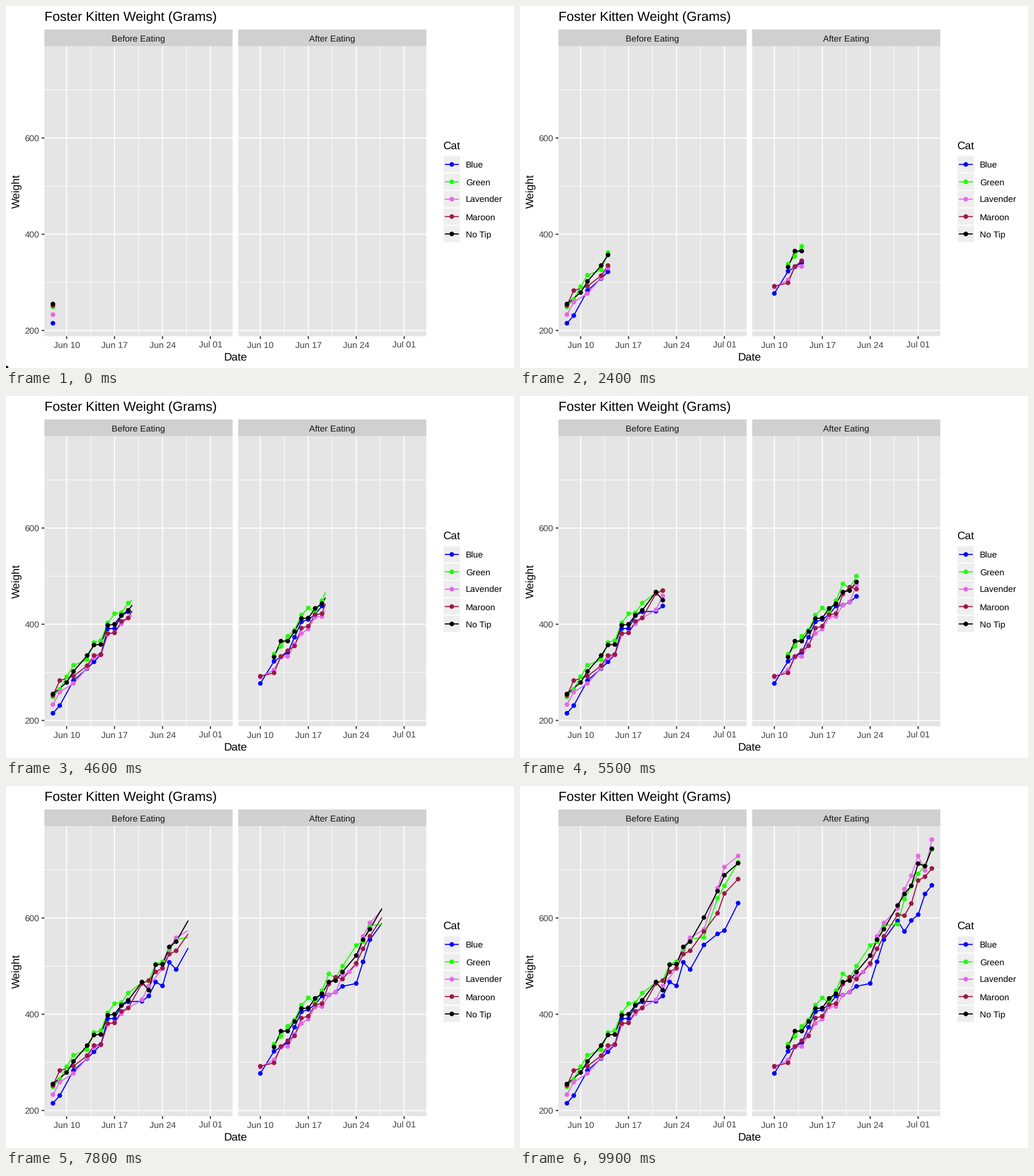
Animation of 885 by 632 pixels, one loop 10 s. Source, as a matplotlib script:

```python
import matplotlib.pyplot as plt
import numpy as np
from matplotlib.animation import FuncAnimation
from matplotlib.patches import Rectangle

plt.rcParams.update({
    "font.family": "Liberation Sans",
    "text.hinting": "none",
    "path.snap": False,
    "lines.solid_capstyle": "butt",
    "lines.solid_joinstyle": "round",
})

W, H = 885, 632
FRAMES, SPAN = 100, 25          # days from Jun 8 to Jul 3
PX = 0.72                       # points per pixel at 100 dpi
THICK, THIN, DOT = 1.87, 0.94, 8.1
TOP, BOTTOM, PANEL_W = 70, 576.5, 327.7
NA = np.nan

COLORS = {"Blue": "#0000ff", "Green": "#1eff00", "Lavender": "#e566ea",
          "Maroon": "#9c1848", "No Tip": "#000000"}

before_days = [0, 1, 2, 3, 5, 6, 7, 8, 9, 10, 11,
               13, 14, 15, 16, 17, 18, 20, 22, 23, 25]
before = {
    "Blue": [215, 231, NA, 283, 308, 322, 337, 391, 391, 418, 426,
             427, 438, 467, 459, 508, 493, 544, 567, 574, 631],
    "Green": [249, 265, 291, 315, 326, 362, 366, 403, 422, 424, 444,
              466, 470, 504, 509, 533, 556, 560, 641, 667, 716],
    "Lavender": [233, 259, NA, 277, 309, 330, 336, 379, 383, 401, 413,
                 430, 459, NA, 495, 537, 559, 576, 662, 706, 729],
    "Maroon": [252, 283, NA, 292, 314, 335, 337, 381, 382, 406, 413,
               464, 470, 488, 496, 525, 532, 572, 610, 651, 681],
    "No Tip": [255, NA, 279, 302, 335, 357, 358, 398, 400, 419, 429,
               467, 450, 503, 504, 540, 551, 601, 656, 689, 714],
}

after_days = [2, 4, 5, 6, 7, 8, 9, 10, 11, 12, 13,
              14, 15, 16, 17, 18, 20, 21, 22, 23, 24, 25]
after = {
    "Blue": [277, 323, 332, 341, 373, 405, 410, 420, 438, 440, 446,
             458, NA, 464, 509, 555, 594, 572, 595, 607, 650, 668],
    "Green": [NA, 338, 354, 375, 388, 419, 434, 424, 449, 484, 475,
              500, NA, 543, 551, 584, 587, 639, 667, 692, 709, 743],
    "Lavender": [290, 305, 332, 333, 358, 381, 390, 415, 416, 440, 446,
                 481, 488, 503, 562, 590, 620, 660, 688, 729, 699, 763],
    "Maroon": [292, 299, 333, 345, 355, 392, 396, 420, 422, 463, 477,
               473, NA, 506, 536, 562, 607, 605, 630, 678, 686, 703],
    "No Tip": [NA, 332, 365, 365, 385, 412, 413, 433, 443, 467, 470,
               488, NA, 522, 555, 577, 626, 650, 667, 713, 708, 744],
}

PANELS = [(67, "Before Eating", before_days, before),
          (404.5, "After Eating", after_days, after)]

fig = plt.figure(figsize=(W / 100, H / 100), dpi=100, facecolor="white")
ax = fig.add_axes([0, 0, 1, 1])
ax.set_xlim(0, W)
ax.set_ylim(H, 0)
ax.axis("off")


def x_of(day, left):
    return left + 14.75 + 11.93 * np.asarray(day)


def y_of(grams):
    return 566.5 - 0.84 * (np.asarray(grams) - 200)


def box(x, y, w, h, color):
    ax.add_patch(Rectangle((x, y), w, h, fc=color, lw=0, zorder=0))


def rule(xs, ys, width, color="white", z=1):
    return ax.plot(xs, ys, color=color, lw=width * PX, zorder=z)[0]


def dots(xs, ys, color, z):
    return ax.scatter(xs, ys, s=(DOT * PX) ** 2, c=color,
                      edgecolors="none", zorder=z)


def label(x, y, text, size, color="black", ha="center", **kw):
    ax.text(x, y, text, fontsize=size * PX, color=color, ha=ha,
            va="baseline", **kw)


def draw_panel(left, title):
    right = left + PANEL_W
    box(left, 41, PANEL_W, TOP - 41, "#d0d0d0")
    box(left, TOP, PANEL_W, BOTTOM - TOP, "#e5e5e5")
    label(left + PANEL_W / 2, 61.5, title, 15.45, "#141414")
    for day in (5.5, 12.5, 19.5):
        rule([x_of(day, left)] * 2, [TOP, BOTTOM], THIN)
    for grams in (300, 500, 700):
        rule([left, right], [y_of(grams)] * 2, THIN)
    for grams in (200, 400, 600):
        rule([left, right], [y_of(grams)] * 2, THICK)
    for day, text in zip((2, 9, 16, 23),
                         ("Jun 10", "Jun 17", "Jun 24", "Jul 01")):
        x = x_of(day, left)
        rule([x, x], [TOP, BOTTOM], THICK)
        rule([x, x], [BOTTOM, BOTTOM + 4.8], THICK, "#282828")
        label(x, 596.5, text, 15.45, "#404040")


def draw_legend():
    label(761.5, 250.3, "Cat", 19.3, ha="left")
    for i, (name, color) in enumerate(COLORS.items()):
        y = 276.6 + 30.33 * i
        box(762.4, y - 14.2, 28.5, 28.4, "#eeeeee")
        rule([764.5, 788.8], [y, y], THICK, color, 2)
        dots([776.6], [y], color, 3)
        label(801, y + 5.9, name, 15.45, ha="left")


class Series:
    """A line that grows with time and the points it has passed."""

    def __init__(self, left, days, grams, color, z):
        grams = np.array(grams, float)
        known = ~np.isnan(grams)
        days = np.array(days)[known]
        self.xs, self.ys = x_of(days, left), y_of(grams[known])
        self.times = np.round(days * (FRAMES - 1) / SPAN)
        self.line = rule([], [], THICK, color, 2 + z / 10)
        self.points = dots([], [], color, 3 + z / 10)

    def show(self, t):
        n = int(np.sum(self.times <= t))
        xs, ys = self.xs[:n], self.ys[:n]
        self.points.set_offsets(np.column_stack([xs, ys]))
        if n:
            xs = np.append(xs, np.interp(t, self.times, self.xs))
            ys = np.append(ys, np.interp(t, self.times, self.ys))
        self.line.set_data(xs, ys)


series = []
for left, title, days, cats in PANELS:
    draw_panel(left, title)
    for z, (name, grams) in enumerate(cats.items()):
        series.append(Series(left, days, grams, COLORS[name], z))

for grams in (200, 400, 600):
    y = y_of(grams)
    rule([62.2, 67], [y, y], THICK, "#282828")
    label(58.2, y + 5.6, str(grams), 15.45, "#404040", "right")

label(67, 26.4, "Foster Kitten Weight (Grams)", 23.15, ha="left")
label(399.5, 619, "Date", 19.3)
label(24, 323.3, "Weight", 19.3, rotation=90, rotation_mode="anchor")
draw_legend()


def update(t):
    for s in series:
        s.show(t)
    return []


anim = FuncAnimation(fig, update, frames=FRAMES, interval=100,
                     repeat=True, repeat_delay=0, blit=False)
plt.show()
```
